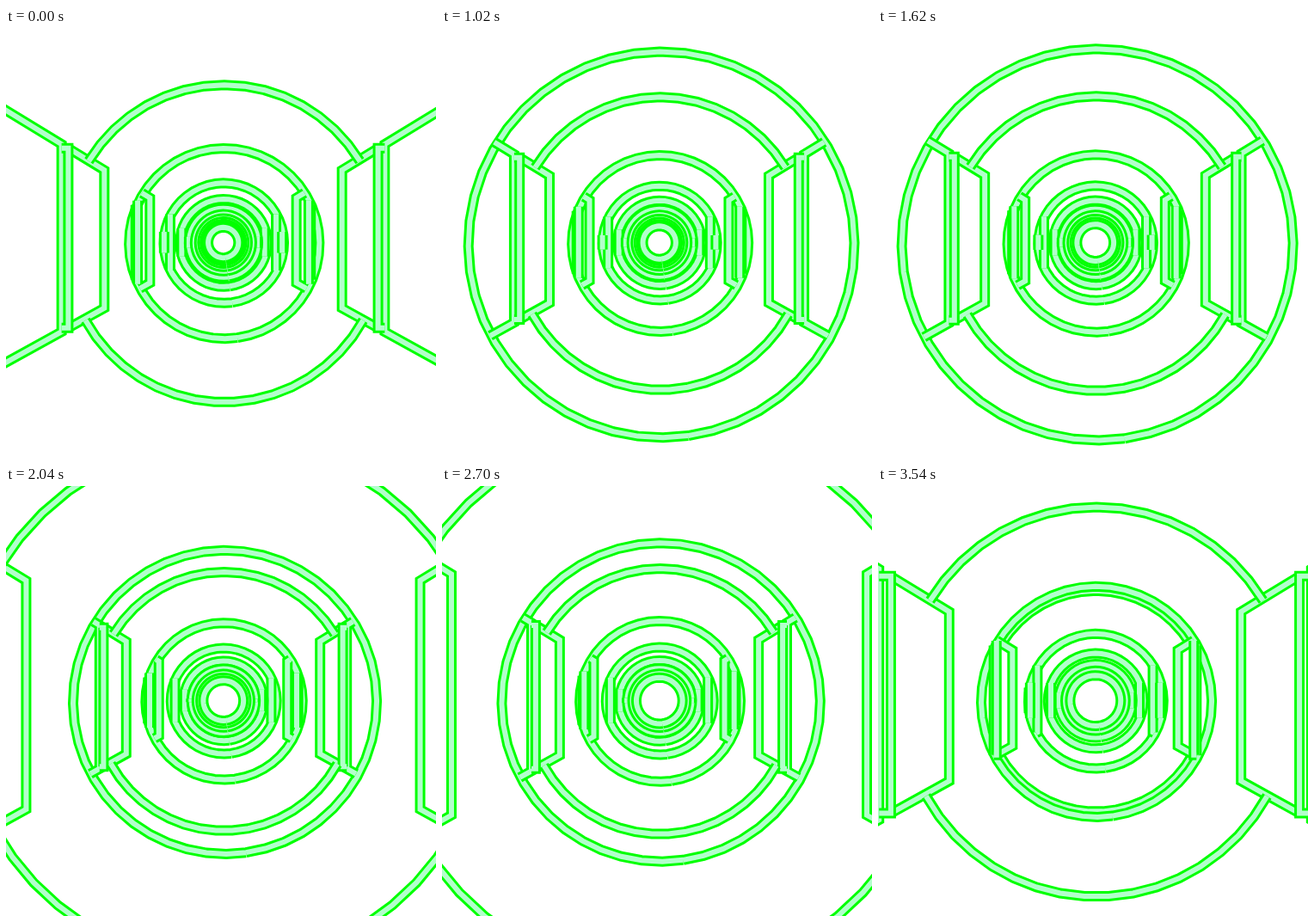
An HTML page with a canvas for the animation above (3.6 s loop, 500x500 px).

```html
<!DOCTYPE html>
<html>
<head>
<meta charset="utf-8">
<style>
  html, body { margin: 0; width: 100%; height: 100%; overflow: hidden; background: #fff; }
  canvas { display: block; }
</style>
</head>
<body>
<canvas id="stage" width="500" height="500"></canvas>
<script>
const ctx = document.getElementById('stage').getContext('2d');

// A corridor of rooms. Depths are measured so that a front hole has radius 1 / depth px.
const FRAMES = 60, FRAME_MS = 60;
const ROOMS = 10, SPACING = 0.0053, START = 0.00374, TRAVEL = 0.02278;
const ROOM_DEPTH = 0.00477, PANEL_DEPTH = 0.00198, SECOND_PANEL = 0.00225;
const BACK_RADIUS = 1.57, SHIFT = 0.0115;
const WALL_X = 1.176, WALL_TOP = 0.715, WALL_BOTTOM = 0.65;
const STEP = Math.PI / 24, SEAM = 82 * Math.PI / 180;

const scaleAt = depth => 1 / Math.max(depth, 1e-4);
const smooth = t => t * t * (3 - 2 * t);

function band(points) {
  ctx.beginPath();
  points.forEach(([x, y]) => ctx.lineTo(x, y));
  ctx.strokeStyle = '#0f0';
  ctx.lineWidth = 12;
  ctx.stroke();
  ctx.strokeStyle = '#b3ffcc';
  ctx.lineWidth = 6;
  ctx.stroke();
}

function arc(radius, scale, from, to) {
  const count = Math.ceil((to - from) / STEP - 1e-6);
  return Array.from({ length: count + 1 }, (_, i) => {
    const a = from + (to - from) * i / count;
    return [radius * Math.cos(a) + SHIFT * scale, radius * Math.sin(a) + SHIFT * scale];
  });
}

// Upright edge of a side panel with arms made by armEnd, cut at the hole radius
function bracket(scale, limit, armEnd) {
  const x = WALL_X * scale;
  if (x >= limit) return;
  const reach = Math.sqrt(limit * limit - x * x);
  const top = WALL_TOP * scale, bottom = WALL_BOTTOM * scale;
  const points = [[x, -Math.min(top, reach)], [x, Math.min(bottom, reach)]];
  if (top < reach) points.unshift(armEnd(-WALL_TOP));
  if (bottom < reach) points.push(armEnd(WALL_BOTTOM));
  band(points);
}

function panels(depth, limit) {
  const far = scaleAt(depth);
  const near = scaleAt(depth - PANEL_DEPTH);
  const second = scaleAt(depth - SECOND_PANEL);
  const end = scaleAt(depth - ROOM_DEPTH);
  const alongWall = max => y => {
    const s = Math.min(max, limit / Math.hypot(WALL_X, y));
    return [WALL_X * s, y * s];
  };
  const acrossGap = y => {
    const edge = Math.sqrt(limit * limit - (y * near) ** 2);
    return [Math.min(WALL_X * second, edge), y * near];
  };
  for (const side of [-1, 1]) {
    ctx.save();
    ctx.scale(side, 1);
    bracket(far, limit, alongWall(near));
    bracket(second, limit, alongWall(end));
    bracket(near, limit, acrossGap);
    ctx.restore();
  }
}

// The parts of the back ring that the side panels leave open
function backRing(radius, scale) {
  const top = Math.atan2(WALL_TOP, WALL_X), bottom = Math.atan2(WALL_BOTTOM, WALL_X);
  band(arc(radius, scale, Math.PI + top, 2 * Math.PI - top));
  band(arc(radius, scale, bottom, Math.PI - bottom));
}

function room(index, travel) {
  const front = START + index * SPACING - travel;
  const back = front + ROOM_DEPTH;
  if (back < 0.002) return;
  const backScale = scaleAt(back), backRadius = BACK_RADIUS * backScale;
  const hasFront = index > 0 && front > 0.001;
  const hole = hasFront ? 1 / front : 1e4;
  const touching = hole - backRadius < 12;

  if (touching && backRadius < hole) backRing(backRadius, backScale);
  if (hasFront) band(arc(hole, hole, SEAM, SEAM + 2 * Math.PI));
  panels(back, hole);
  if (!touching) backRing(backRadius, backScale);
}

function draw(now) {
  const frame = Math.floor(now / FRAME_MS) % FRAMES;
  const travel = TRAVEL * smooth(frame / (FRAMES - 1));
  ctx.setTransform(1, 0, 0, 1, 0, 0);
  ctx.fillStyle = '#fff';
  ctx.fillRect(0, 0, 500, 500);
  ctx.translate(252.5, 249.3);
  for (let i = 0; i <= ROOMS; i++) room(i, travel);
  requestAnimationFrame(() => draw(performance.now() - start));
}

const start = performance.now();
draw(0);
</script>
</body>
</html>
```
